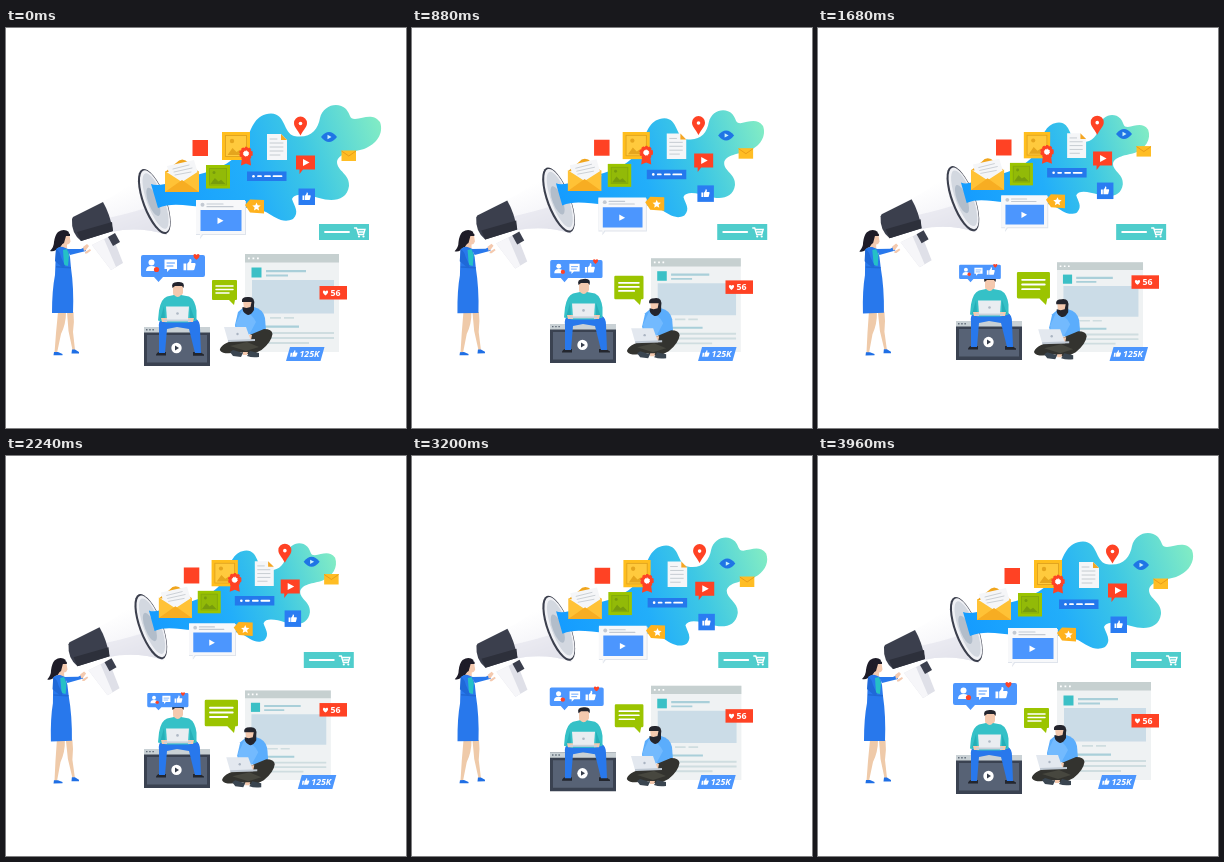
Write an HTML page that moves like this. It is 400x400 px and loops after 4000 ms.

```html
<!DOCTYPE html>
<html lang="en">
<head>
<meta charset="utf-8">
<title>Marketing megaphone</title>
<style>
html, body { margin: 0; width: 100%; height: 100%; overflow: hidden; background: #fff; }
svg { display: block; width: 100vw; height: 100vh; }
text { font: bold 8.8px "Open Sans", "Noto Sans", sans-serif; fill: #fff; }
.line { fill: none; stroke: #fff; stroke-linecap: round; }
</style>
</head>
<body>
<svg viewBox="0 0 400 400">
<defs>
  <linearGradient id="splash" gradientUnits="userSpaceOnUse" x1="150" y1="175" x2="375" y2="95">
    <stop offset="0" stop-color="#159cff"/><stop offset=".4" stop-color="#22aefa"/>
    <stop offset=".66" stop-color="#3ec8e4"/><stop offset="1" stop-color="#82ecc4"/>
  </linearGradient>
  <linearGradient id="horn" gradientUnits="userSpaceOnUse" x1="115" y1="160" x2="133" y2="208">
    <stop offset="0" stop-color="#fff"/><stop offset=".5" stop-color="#f7f7fa"/><stop offset="1" stop-color="#dcdde6"/>
  </linearGradient>
  <path id="thumb" fill="#fff" d="M0 4h2.500v6H0zM3.300 4.300 5.200 2 5.500 0q1.700-.3 1.700 1.500L6.800 3.600H10q1 .3.8 1.300L9.700 9.300Q9.400 10 8.600 10H3.300z"/>
  <path id="heart" d="M0 3.200C-5.600-.7-2.200-4.400 0-1.600 2.200-4.400 5.600-.7 0 3.200z"/>
  <path id="mountains" d="M0 12 5 5l4 4 3-2 5 5z"/>
</defs>

<!-- web page -->
<g data-scale=".9 .9 239 323">
  <path fill="#eff2f3" d="M239 226h94v98h-94z"/>
  <path fill="#c6d0d0" d="M239 226h94v8.500h-94z"/>
  <path stroke="#fff" stroke-width="1.700" stroke-dasharray="1.800 2.700" d="M242 230.300h12"/>
  <path fill="#3bc0c6" d="M245.500 239.500h10v10h-10z"/>
  <path fill="#a9cfd9" d="M260 242h40v2.200h-40zM260 246.500h22v2h-22zM258 297.500h35v2.200h-35z"/>
  <path fill="#cbdce7" d="M246 252h82v33.500h-82z"/>
  <path fill="#cfdde0" d="M264 289h11v1.800h-11zM278 289h10v1.800h-10zM248 304h80v2h-80zM248 309h80v2h-80zM248 314h55v2h-55z"/>
</g>

<!-- megaphone -->
<g data-shift="-4 -3.300">
  <path fill="#dfe0e8" d="M86 217 106 207 117 235 105 242z"/>
  <path fill="#f6f6f9" d="M86 217 98 211 110 239 105 242z"/>
  <path fill="#3b3f4d" d="m102 209 7-4 5 9-7 4z"/>
  <path fill="url(#horn)" d="M95 174Q121 163 135 141L161 207Q134 198 105 204z"/>
  <path fill="#e5e6ee" d="M102 190Q129 184 146 178L161 207Q134 198 105 204z" opacity=".7"/>
  <path fill="#3b3f4d" d="M67 189 97 174Q104 186 107 203L75 213Q65 205 66 191z"/>
  <path fill="#2d303b" d="m71 204 35-10 1 9-32 10z"/>
  <g transform="translate(148.300 173.500) rotate(-20.500)">
    <ellipse rx="11.800" ry="34.500" fill="#3b3f4d"/>
    <ellipse cx=".8" rx="10.500" ry="32.700" fill="#f0f1f5"/>
    <ellipse cx="1.300" rx="8.500" ry="29.500" fill="#d3d8e0"/>
    <ellipse cx="-1" rx="5" ry="15" fill="#b2bdca"/>
  </g>
</g>

<!-- splash -->
<g data-shift="-3.500 0" data-scale=".785 .827 150 146">
  <path fill="url(#splash)" d="M145 156C155 160 172 151 190 147C212 142 232 133 241 113C245 99 250 86 265 85.500C280 86 277 105 288 108C304 111 312 102 314 90C317 77 332 73 340 81C345 87 343 91 349 91C358 90 367 85 374 94C378 105 371 116 358 121C348 124 332 125 331 134C331 143 344 146 343 158C341 173 326 174 313 170C302 167 289 164 286 171C288 178 294 184 287 191C277 196 269 189 260 184C245 177 222 180 200 179C181 178 166 174 152 180z"/>
</g>

<!-- icons on the splash -->
<g data-shift="-10 -.6"><path fill="#ff4224" d="M186.500 112H202v16h-15.500z"/></g>
<g data-shift="-7.600 -2" data-scale=".97 .97 176 150">
  <path fill="#f0a51c" d="M159 144 170 135q6-7 13 0l10 9z"/>
  <path fill="#f5f6f8" d="m161 138 27-6 5 17-16 8-12-4z"/>
  <path class="line" style="stroke:#cbd0d5" d="m167 141 16-4m-15 7 18-4m-17 7 16-3"/>
  <path fill="#ffc236" d="M159 143 176 154 193 143V164H159z"/>
  <path fill="#f7ad22" d="m159 164 17-12 17 12z"/>
</g>
<g data-shift="-12 0" data-scale=".93 .93 216 104">
  <path fill="#ffbe1e" d="M216 104h28v28h-28z"/><path fill="#e2a51f" d="M219 107h22v22h-22z"/>
  <path fill="#ffca3d" d="M220 108h20v20h-20z"/>
  <use href="#mountains" x="221.500" y="115" fill="#e5a51d"/><circle cx="226" cy="113" r="2.200" fill="#e5a51d"/>
</g>
<g data-shift="-13 -2">
  <path fill="#ff4224" d="m236 129-1 8.500 5-2 5 2-1-8.500z"/>
  <circle cx="240" cy="125.500" r="6" fill="#ff4224" stroke="#ff4224" stroke-width="1.600" stroke-dasharray="2.400 1.400"/>
  <circle cx="240" cy="125.500" r="2.600" fill="#fff" stroke="#fff" stroke-dasharray="1.200 .8"/>
</g>
<g data-shift="-14 -1" data-scale=".94 .95 261 106">
  <path fill="#f5f6f8" d="M261 106h14l6 6v20h-20z"/><path fill="#f5a623" d="M275 106v6h6z"/>
  <path class="line" style="stroke:#c5cbd0" d="M264 111h7m-7 4h13m-13 4h13m-13 4h13m-13 4h10"/>
</g>
<g data-shift="-9.500 -2.500" data-scale=".95 .95 200 137">
  <path fill="#9bc400" d="M200 137h24v23.500h-24z"/><path fill="#84aa0a" d="M203 140h18v17.500h-18z"/>
  <path fill="#92ba08" d="M204 141h16v15.500h-16z"/>
  <use href="#mountains" transform="translate(204.500 145.500) scale(.88)" fill="#779c0c"/><circle cx="208" cy="144.500" r="1.500" fill="#779c0c"/>
</g>
<g data-shift="-18 -1">
  <path fill="#ff4224" d="M294.500 107.500C291 101 288 99 288 95a6.500 6.500 0 0 1 13 0c0 4-3 6-6.500 12.500z"/>
  <circle cx="294.500" cy="95.500" r="1.800" fill="#fff"/>
</g>
<g data-shift="-20 -3.600">
  <path fill="#1f75e5" d="M315 109q8-10 16 0-8 10-16 0z"/>
  <path fill="#c9f2fb" d="m321.500 106.800 4 2.200-4 2.200z"/>
</g>
<g data-shift="-17.600 -4.600">
  <path fill="#ff4224" d="M290 127.500h19v14h-12l-3.500 4.500v-4.500H290z"/><path fill="#fff" d="m297 131 6.500 3.500-6.500 3.500z"/>
</g>
<g data-shift="-20 -5.200">
  <path fill="#ffbd24" d="M335.500 122.500h14.500v10.500h-14.500z"/><path fill="none" stroke="#e99d18" d="m335.500 123 7.300 5 7.200-5"/>
</g>
<g data-shift="-14 -4">
  <path fill="#2478ec" d="M241 143.500h39.500v9.500H241z"/>
  <circle cx="247.500" cy="148.200" r="1.300" fill="#fff"/>
  <path class="line" stroke-width="1.800" d="M252 148.200h3m4 0h5m3.500 0h8"/>
</g>
<g data-shift="-16 -7"><path fill="#2a7cf2" d="M292.500 160.500H309V177h-16.500z"/><use href="#thumb" transform="translate(296.500 164.500) scale(.76)"/></g>
<g data-shift="-8 -5.600" data-scale=".93 .93 190 172">
  <path fill="#dfe4ec" d="M190 173h50v34h-43l-3 4v-4h-4z"/><path fill="#f7f8fa" d="M190 172h49v34h-43l-2 4v-4h-4z"/>
  <circle cx="196.500" cy="176.800" r="2" fill="#c3c9d2"/>
  <path class="line" style="stroke:#c3c9d2" stroke-width="1.200" d="M201 176h16m-16 2.700h26"/>
  <path fill="#4c96fe" d="M194.500 182h41v21h-41z"/><path fill="#fff" d="m211.500 189.500 6 3.300-6 3.300z"/>
</g>
<g data-shift="-13 -6.300">
  <path fill="#ffb21d" d="m239 177 5-5.500 14 .5v13.500l-14-1z"/>
  <path fill="#fff" d="m250.500 174.500 1.200 2.700 3 .3-2.300 2 .7 3-2.600-1.500-2.600 1.500.7-3-2.300-2 3-.3z"/>
</g>

<!-- woman -->
<g data-turn="-1.750 60 326">
  <path fill="#efcaa9" d="M52 284h8q0 12-5 22l-4 19h-2.500l1.500-20zM61 284h6.500q1 9-.5 20l2 18h-2.500l-4-19z"/>
  <path fill="#1f6fe5" d="M48 324h4l4.500 2v1.200H47.500zM66 321.500h3l4 2.500v1.500h-7.500z"/>
  <path fill="#1e1c28" d="M52 204q6-4 11 0l-4 9-2 6q-5 0-7 3-3 2-6 1 4-4 4-9 1-7 4-10z"/>
  <path fill="#f4c9ae" d="M57 207h6.500l1 6.500q-1 3-3.500 3v4l-4 2-3-3 2-3z"/>
  <path fill="#1e1c28" d="M54 206q4-5 10 0v2l-4 0-2 7-3 2z"/>
  <path fill="#2878ec" d="M50 221q4-3 7-2l5 2 2 8 1 11q3 20 2 45H46q0-23 3-38z"/>
  <path fill="#25c0c6" d="m57 222 4-1 2 6-1 11-4-1z"/>
  <path fill="#1c62cd" d="m50 238 15 1v1.500l-15-1z" opacity=".7"/>
  <path fill="#1f69d8" d="M50 221q4 2 5 8l4 9-2 2-8-7z"/>
  <path fill="#2878ec" d="m61 221 14 0 4-2 1 4-16 4z"/>
  <path fill="#f4c9ae" d="m77 219 4-3 2 2-3 4-2 1zM79 224l5-3 1 1.500-4 3-2 0z"/>
</g>

<!-- video player and man -->
<g data-shift="0 -7">
  <path fill="#3a4251" d="M138 299h66v39h-66z"/><path fill="#c9d1d5" d="M138 299h66v5.500h-66z"/>
  <path stroke="#626d7a" stroke-width="1.400" stroke-dasharray="1.500 1.700" d="M140 301.700h8"/>
  <path fill="#576275" d="M141 307h60v27.500h-60z"/>
  <circle cx="170.500" cy="320" r="5.200" fill="#fff"/><path fill="#363d4b" d="m169 317.500 4 2.500-4 2.500z"/>
  <path fill="#23262e" d="M153 324h7v3.500h-10q0-2.500 3-3.500zM187 324h7l4 2.500v1.200h-11z"/>
  <path fill="#2878ec" d="M156 291h34q4 2 4 9l1 25h-6l-6-24-12-2-10 2-2 24h-6l0-25q-1-7 3-9z"/>
  <path fill="#f4c9ae" d="M167 257h10v8q-2 4-3 4v3h-5v-3q-2-1-2-4z"/>
  <path fill="#23242d" d="M166.500 260q-2-6 5-6 8-1 6 6l-1.500-2h-7z"/>
  <path fill="#35c1c7" d="M161 268.500 168 267q4 4 7 0l8 1.500q6 3 7.500 14l0 10-8 2H160l-8-2 1-10q2-12 8-14z"/>
  <path fill="#22a9b2" d="m158 278 1 12-5 2zm26 0 0 12 5 2z" opacity=".7"/>
  <path fill="#f4c9ae" d="M155 290h6v4h-5zM182 290h6l-1 4h-5z"/>
  <path fill="#e9edf1" d="M160 278.500h23l-1 13.500h-21z"/><path fill="#c9d1da" d="M158 291.500h27v2h-27z"/>
  <circle cx="171.500" cy="285.500" r="1.300" fill="#aeb8c4"/>
</g>

<!-- seated man with beard -->
<g data-shift="2.600 2.600">
  <path fill="#5badfc" d="M232 284 238 279h10q9 2 11 11l1 13-7 3h-23l-1-9z"/>
  <path fill="#7bbfff" d="M236 282q9 2 14 12l-7 13h-12l-1-12z" opacity=".75"/>
  <path fill="#f4c9ae" d="M237 272h10v9h-9z"/>
  <path fill="#24252d" d="M236 274q-1-5 5.500-5 8-1 6.500 8l0 5q-4 7-8 4-4-2-3.500-7l4 1 4-1 1-5h-8z"/>
  <path fill="#33332f" d="M214 321q3-7 20-10l24-10q8 0 8.500 5-1 8-11 16l-10 5-12-3q-16 3-19-1-1-1-.5-2z"/>
  <path fill="#47473f" d="m224 318 17-4 12 5-13 4z"/>
  <path fill="#3a4550" d="m227 322 10 3-2 4-8-1-3-4zM244 323l9 2 0 4q-7 1-12-1z"/>
  <path fill="#f4c9ae" d="m237 324 5 0-1 3h-4zM240 307h6l-1 5h-6z"/>
  <path fill="#e3e8ef" d="m218 299 22 0 5 14h-23z"/><path fill="#bfc8d3" d="m222 312 27-1v2l-27 1z"/>
  <circle cx="231.500" cy="306" r="1.200" fill="#aab4c2"/>
</g>

<!-- social bubbles -->
<g data-scale=".59 .59 152.500 255">
  <path fill="#4c96fe" d="M137 227h60q2 0 2 2v18q0 2-2 2h-40l-4.500 5-4.500-5h-11q-2 0-2-2v-18q0-2 2-2z"/>
  <circle cx="145.500" cy="234.500" r="3" fill="#fff"/><path fill="#fff" d="M140 243q0-5 5.500-5t5.500 5z"/>
  <circle cx="150.500" cy="241.500" r="2.600" fill="#ff4224"/>
  <path fill="#fff" d="M158.500 231.500H171v9.500h-7l-3 3v-3h-2.500z"/>
  <path class="line" style="stroke:#4c96fe" d="M161 235h7.500m-7.500 3h6"/>
  <use href="#thumb" transform="translate(177.500 231) scale(1.120)"/>
  <use href="#heart" x="190.500" y="228.500" fill="#ff4224"/>
</g>
<g data-scale="1.380 1.380 228 277">
  <path fill="#9bc400" d="M207 252h23q1 0 1 1v18q0 1-1 1h-1l-1 5-5-5h-16q-1 0-1-1v-18q0-1 1-1z"/>
  <path class="line" stroke-width="1.500" d="M210 258h17m-17 3.500h17m-17 3.500h13"/>
</g>
<g data-shift="-17.500 0">
  <path fill="#4fcdcc" d="M313 196h50v16H313z"/><path class="line" stroke-width="1.800" d="M319 204h24"/>
  <path class="line" stroke-width="1.300" d="M348.500 200h2l2 6.500h5l1.500-5h-7.500m1.500 2.500h5"/>
  <circle cx="353" cy="208.500" r="1.100" fill="#fff"/><circle cx="357.500" cy="208.500" r="1.100" fill="#fff"/>
</g>
<g data-shift="0 -12.600">
  <path fill="#ff4224" d="M313.500 258H341v13.500h-27.500z"/>
  <use href="#heart" transform="translate(319.500 264.800) scale(.85)" fill="#fff"/><text x="324.500" y="268">56</text>
</g>
<g data-shift="13.600 0">
  <path fill="#4c96fe" d="M284 319h34.500l-4 14H280z"/>
  <use href="#thumb" transform="translate(285 322.300) skewX(-8) scale(.64)"/><text x="293.500" y="329.200" font-style="italic" style="font-style:italic">125K</text>
</g>
</svg>
<script>
const LOOP = 4000, STEP = 40, MIDDLE = (LOOP / STEP - 1) / 2;
const numbers = (text, fallback) => (text || fallback).split(" ").map(Number);

const parts = [...document.querySelectorAll("g[data-shift], g[data-scale], g[data-turn]")].map(node => ({
  node,
  shift: numbers(node.dataset.shift, "0 0"),
  scale: numbers(node.dataset.scale, "1 1 0 0"),
  turn: numbers(node.dataset.turn, "0 0 0")
}));

function pose(progress) {
  for (const { node, shift: [dx, dy], scale: [sx, sy, ox, oy], turn: [angle, cx, cy] } of parts) {
    const grow = size => 1 + (size - 1) * progress;
    node.setAttribute("transform",
      `translate(${ox + dx * progress} ${oy + dy * progress}) scale(${grow(sx)} ${grow(sy)}) ` +
      `translate(${-ox} ${-oy}) rotate(${angle * progress} ${cx} ${cy})`);
  }
}

// Linear swing out and back, at 25 steps per second.
function draw() {
  const step = Math.floor(performance.now() % LOOP / STEP);
  pose(1 - Math.abs(step - MIDDLE) / MIDDLE);
  requestAnimationFrame(draw);
}
draw();
</script>
</body>
</html>
```
